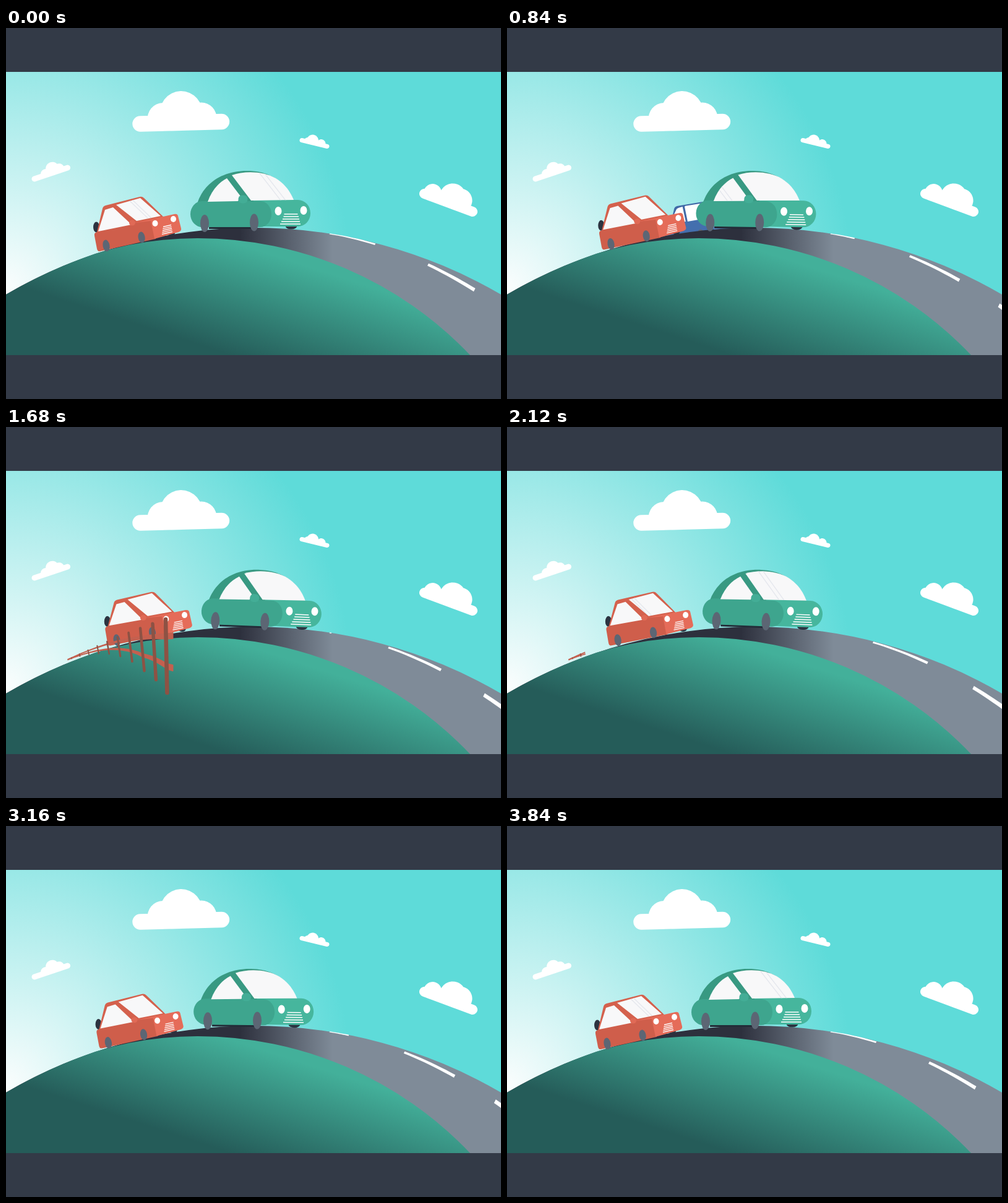
Write an HTML page that moves like this. It is 800 by 600 pixels and loops after 3.88 s.

```html
<!DOCTYPE html>
<html lang="en">
<head>
<meta charset="utf-8">
<title>Cars on a hill</title>
<style>
html, body { margin: 0; width: 100%; height: 100%; overflow: hidden; background: #333a47; }
svg { display: block; width: 800px; height: 600px; }
</style>
</head>
<body>
<svg viewBox="0 0 800 600" xmlns="http://www.w3.org/2000/svg">
  <defs>
    <radialGradient id="sky" gradientUnits="userSpaceOnUse" cx="0" cy="420" r="560">
      <stop offset="0" stop-color="#fafdfd"/>
      <stop offset="1" stop-color="#5edbd9"/>
    </radialGradient>
    <linearGradient id="grass" gradientUnits="userSpaceOnUse" x1="300" y1="508" x2="354" y2="342">
      <stop offset="0" stop-color="#255c59"/>
      <stop offset="1" stop-color="#43b09a"/>
    </linearGradient>
    <linearGradient id="tar" gradientUnits="userSpaceOnUse" x1="378" y1="0" x2="528" y2="0">
      <stop offset="0" stop-color="#2d303d"/>
      <stop offset="1" stop-color="#7f8b98"/>
    </linearGradient>
    <clipPath id="greenGlass">
      <path id="gSide" d="M326 281C332 264 342 251 357 243L379 272L375 280Z"/>
      <path id="gFront" d="M365 238C385 231 415 231 436 243C452 253 460 266 465 278L396 279Z"/>
    </clipPath>
    <clipPath id="redGlass">
      <path id="rSide" d="M149 329L160 294L173 290L203 318Z"/>
      <path id="rFront" d="M178 286L217 275L250 304L211 312Z"/>
    </clipPath>
  </defs>

  <rect y="71" width="800" height="458" fill="url(#sky)"/>
  <g id="clouds" fill="#fff"></g>

  <g id="truck">
    <path d="M596 318L620 289Q623 286 628 287L692 307Q698 309 697 315L688 352Z" fill="#4169a6"/>
    <path d="M563 305L598 315L687 347L680 380L549 339Q546 338 547 334L556 308Q558 304 563 305Z" fill="#446fae"/>
    <path d="M686 349L743 368Q748 370 747 375L741 402L679 380Z" fill="#5f90cc"/>
    <path d="M593 317L624 293Q627 291 639 294L630 328Z" fill="#fff"/>
    <path d="M643 297Q644 294 648 296L691 310Q695 311 694 314L686 346L634 330Z" fill="#fff"/>
    <circle cx="587" cy="310" r="6" fill="#5f90cc"/>
    <ellipse cx="570" cy="341" rx="7" ry="9" fill="#5c6674"/>
    <ellipse cx="650" cy="368" rx="7" ry="9" fill="#5c6674"/>
    <g fill="#cb5a4a">
      <rect x="687.5" y="356" width="11" height="14" rx="2" transform="rotate(17 693 363)"/>
      <rect x="731.5" y="372" width="11" height="14" rx="2" transform="rotate(17 737 379)"/>
    </g>
  </g>

  <path d="M0 529V431A794.7 794.7 0 0 1 800 431V529Z" fill="url(#tar)"/>
  <path id="dashes" fill="#fff"/>
  <path d="M0 530V431A794.7 794.7 0 0 1 145 364.7A557 557 0 0 1 310 340A606.7 606.7 0 0 1 751 530Z" fill="url(#grass)"/>

  <g id="red">
    <ellipse cx="146" cy="322" rx="5" ry="8.5" fill="#2c3340"/>
    <ellipse cx="267" cy="332" rx="6" ry="4" fill="#2c3340"/>
    <path d="M146 334L156 292Q157 288 161 287L216 273Q220 272 223 275L254 305L210 326Z" fill="#d4614d"/>
    <path d="M147 330L236 309L242 341L152 361Q148 362 147 357L143 336Q142 331 147 330Z" fill="#cf5e4b"/>
    <path d="M208 315L272 301Q277 300 278 304L283 324Q284 328 279 330L240 341L234 312Z" fill="#e56c59"/>
    <use href="#rSide" fill="#f8f8f9"/>
    <use href="#rFront" fill="#f8f8f9"/>
    <g clip-path="url(#redGlass)"><path class="glint" d="M-22 270L26 316M-16 270L32 316"/></g>
    <ellipse cx="204" cy="315" rx="5" ry="4.5" fill="#e06a56"/>
    <ellipse cx="162" cy="352" rx="5.5" ry="9.5" transform="rotate(-10 162 352)" fill="#5c6674"/>
    <ellipse cx="219" cy="338.5" rx="5.5" ry="9" transform="rotate(-10 219 338)" fill="#5c6674"/>
    <ellipse cx="241" cy="316" rx="4.5" ry="5" fill="#fff"/>
    <ellipse cx="270.5" cy="309" rx="4.5" ry="5" fill="#fff"/>
    <path d="M254 321.5L267 318.5M253.5 324.5L267.5 321.3M253 327.5L268 324M252.5 330.5L268.5 326.7M252 333.5L269 329.5" stroke="#fff" stroke-width="1.3"/>
  </g>

  <g id="green">
    <rect x="328" y="316" width="78" height="9" fill="#232c38"/>
    <ellipse cx="461" cy="320" rx="9.5" ry="5.5" fill="#2c3340"/>
    <path d="M309 284C318 255 345 231 390 231C430 231 455 253 465 280Z" fill="#389982"/>
    <path d="M400 278H472A20 21.5 0 0 1 472 321H400Z" fill="#46b69d"/>
    <path d="M317 280H411A18 21 0 0 1 411 322H317A19 21 0 0 1 317 280Z" fill="#3ea58e"/>
    <use href="#gSide" fill="#f8f8f9"/>
    <use href="#gFront" fill="#f8f8f9"/>
    <g clip-path="url(#greenGlass)"><path class="glint" d="M-24 230L18 284M-16 230L26 284"/></g>
    <rect x="375.5" y="270.5" width="15" height="13" rx="6" fill="#43ad96"/>
    <ellipse cx="321" cy="316" rx="7" ry="14" fill="#5c6674"/>
    <ellipse cx="401" cy="314.5" rx="7" ry="14" fill="#5c6674"/>
    <ellipse cx="440" cy="296" rx="5.5" ry="7" fill="#fff"/>
    <ellipse cx="481" cy="295" rx="5.5" ry="7" fill="#fff"/>
    <path d="M449.5 301H471.5M448.5 305H473M447 309H474M445 313H475M443 317H476" stroke="#fff" stroke-width="1.5"/>
  </g>

  <g id="fence">
    <path id="rails" fill="#c4604f" stroke="#c4604f" stroke-width="1.5" stroke-linejoin="round"/>
    <g id="posts" stroke="#8d5244" stroke-linecap="round"></g>
  </g>

  <path d="M0 0H800V71H0ZM0 529H800V600H0Z" fill="#333a47"/>
</svg>
<script>
const LOOP = 3880, SPAN = 3840, STEP = 40, POSTS = 10;
const HUB = '400 1117.7';
const $ = id => document.getElementById(id);
const add = (parent, tag, attrs) => {
  const el = document.createElementNS('http://www.w3.org/2000/svg', tag);
  for (const k in attrs) el.setAttribute(k, attrs[k]);
  return parent.appendChild(el);
};

// A tilted pill of length len and radius r, with puffs (along, up, radius) cut flat at its base
function cloud(x, y, tilt, len, r, puffs) {
  const arcs = puffs.map(([u, v, p]) => {
    const half = Math.sqrt(p * p - (v + r) ** 2) || 0;
    return `M${u - half} ${r}A${p} ${p} 0 1 1 ${u + half} ${r}Z`;
  });
  const pill = `M0 ${-r}H${len}A${r} ${r} 0 0 1 ${len} ${r}H0A${r} ${r} 0 0 1 0 ${-r}Z`;
  add($('clouds'), 'path', { d: pill + arcs.join(''), transform: `translate(${x} ${y}) rotate(${tilt})` });
}
cloud(217, 155, -1.5, 131.5, 12.7, [[66.5, 17.2, 34], [37, 8, 25], [99, 7.3, 24.5]]);
cloud(478, 181.5, 13.7, 42.2, 3.5, [[17.1, 3.7, 9.5], [31.9, 2.1, 7], [9, 1.3, 5]]);
cloud(46, 244, -18.6, 56.5, 4.5, [[32.7, 6.2, 11], [43.3, 3.2, 8], [19.6, 1.8, 8]]);
cloud(676, 268, 20.4, 83.2, 8, [[12.1, 6, 14.5], [44.8, 11.3, 21.5], [58.2, 9.9, 19.5]]);

const posts = Array.from({ length: POSTS }, () => add($('posts'), 'path', {}));
const fmt = pts => 'M' + pts.map(p => p[0].toFixed(1) + ' ' + p[1].toFixed(1)).join('L');

function dashes(t) {
  const gap = 0.42, len = 0.213, near = 0.26, far = 1.05;
  const shift = 0.211 - t * 10 * gap / SPAN;
  const first = ((shift % gap) + gap) % gap - gap;
  let d = '';
  for (let s = first; s < far; s += gap) {
    const a = Math.max(s, near), b = s + len;
    if (b <= a) continue;
    const top = [], low = [];
    for (let i = 0; i <= 10; i++) {
      const x = 400 + 478 * Math.sin(a + (b - a) * i / 10);
      const e = x - 530, y = 334 + 0.17 * e + 0.000988 * e * e;
      const h = 0.6 + Math.max(0, x - 525) * 0.0085;
      top.push([x + h * 0.5, y - h]);
      low.unshift([x - h * 0.5, y + h]);
    }
    d += fmt(top.concat(low)) + 'Z';
  }
  $('dashes').setAttribute('d', d);
}

// v counts posts away from the spot where the last one stands at 1680 ms
function post(v) {
  const x = v > 0 ? 166 + 92 * Math.exp(0.24 * v) : 258 + 21.5 * v + 0.51 * v * v;
  const y = 296 + 0.000435 * (x - 360) ** 2 + Math.max(0, 0.27 * (285 - x));
  const size = v > 0 ? Math.exp(0.172 * v)
    : Math.exp(0.27 * v) * Math.max(0, Math.min(1, 1 + 0.11 * (v + 2)));
  const lean = -0.02 + 0.04 * v + 0.0023 * v * v;
  const wide = Math.exp(0.19 * v);
  return { wide, thick: Math.min(wide, v > 0 ? wide : size), at: (len, pad = 0) => [x - lean * len * size, y + len * size + pad] };
}

function rail(drop, from, to) {
  const top = [], low = [];
  for (let i = 0; i <= 24; i++) {
    const p = post(from + (to - from) * i / 24), [x, y] = p.at(drop), h = 4.3 * p.thick;
    top.push([x, y - h]);
    low.unshift([x, y + h]);
  }
  return fmt(top.concat(low)) + 'Z';
}

function fence(t) {
  const e = t - 1680, last = -0.02136 * e + 0.0000072 * e * e;
  const first = last - POSTS + 1;
  const from = Math.max(first - 0.5, -9.5), to = Math.min(last + 0.5, 11);
  const on = t > 600 && t < 2400 && to > from;
  $('fence').style.display = on ? '' : 'none';
  if (!on) return;
  $('rails').setAttribute('d', rail(31, from, to) + rail(79, from, to));
  posts.forEach((el, k) => {
    const v = first + k, show = v > -9.6 && v < 11;
    el.style.display = show ? '' : 'none';
    if (!show) return;
    const p = post(v);
    el.setAttribute('d', fmt([p.at(0, 3.3 * p.wide), p.at(122)]));
    el.setAttribute('stroke-width', 6.6 * p.wide);
  });
}

function truck(t) {
  const k = (t - 520) / 640, on = t > 200 && t < 1320;
  $('truck').style.display = on ? '' : 'none';
  $('truck').setAttribute('transform',
    `rotate(${-53.7 * k} ${HUB}) translate(744 400) scale(${Math.max(0.25, 1 - 0.6 * k)}) translate(-744 -400)`);
}

function ease(s, power) {
  return s < 0.5 ? (2 * s) ** power / 2 : 1 - (2 - 2 * s) ** power / 2;
}

function draw(t) {
  const s = 1 - Math.abs(t / (SPAN / 2) - 1);
  const r = ease(s, 2.7), g = (1 - Math.cos(Math.PI * s)) / 2;
  $('red').setAttribute('transform', `translate(0 ${-2.3 * r}) rotate(${1.29 * r} ${HUB})`);
  $('green').setAttribute('transform', `rotate(${1.3 * g} ${HUB}) rotate(${0.9 * g} 395 300)`);
  const sweep = 0.115 * (t % (SPAN / 2));
  glints[0].setAttribute('transform', `translate(${212 - sweep} 0)`);
  glints[1].setAttribute('transform', `translate(${430 - sweep} 0)`);
  dashes(t);
  truck(t);
  fence(t);
}

const glints = document.querySelectorAll('.glint');
for (const el of glints) {
  el.setAttribute('stroke', '#e6e8ee');
  el.setAttribute('stroke-width', 1.5);
}

const start = performance.now();
function tick() {
  const t = (performance.now() - start) % LOOP;
  draw(Math.floor(t / STEP) * STEP);
  requestAnimationFrame(tick);
}
draw(0);
requestAnimationFrame(tick);
</script>
</body>
</html>
```
